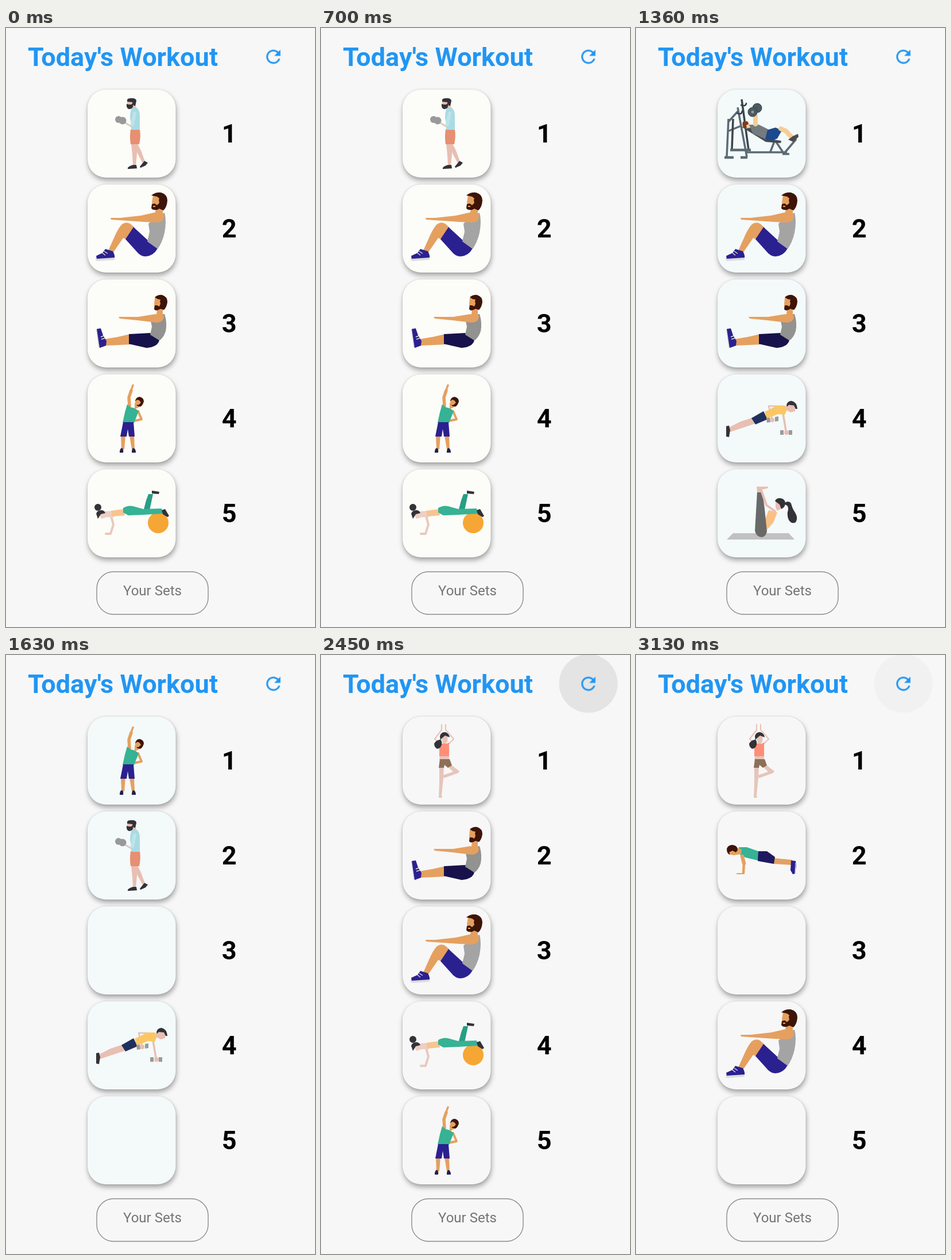
These frames come from a looping animation (538x1041 px, 3.19 s). An HTML page:

```html
<!DOCTYPE html>
<html lang="en">
<head>
<meta charset="utf-8">
<title>Today's Workout</title>
<style>
html, body { margin: 0; width: 100%; height: 100%; overflow: hidden; background: #f7f7f7; }
svg { display: block; width: 100%; height: 100%; }
text { font-family: Roboto, sans-serif; }
.title { font-size: 45px; font-weight: 700; fill: #2196f3; }
.number { font-size: 45px; font-weight: 700; text-anchor: middle; }
.label { font-size: 24px; fill: #757575; }
.card { filter: drop-shadow(0 0 1.5px #0002) drop-shadow(1px 5px 4px #0005); }

.card, .scene, .ripple { animation: 3190ms step-end infinite; }
.card { animation-name: tint; }
.ripple { animation-name: ripple; }
.scene { opacity: 0; }
@keyframes tint { 0% { fill: #fcfcf8 } 29.15% { fill: #f4f9fa } 55.48% { fill: #fafaf5 } 76.8%, to { fill: #f7f7f7 } }
@keyframes ripple {
  0% { opacity: 0 }
  29.15% { opacity: .072 } 31.34% { opacity: .05 } 33.54% { opacity: .025 } 35.73% { opacity: 0 }
  55.48% { opacity: .072 } 57.67% { opacity: .055 } 59.87% { opacity: .035 } 62.06% { opacity: .018 } 64.57% { opacity: 0 }
  76.8% { opacity: .072 } 78.99% { opacity: .05 } 81.18% { opacity: .025 } 83.38% { opacity: 0 }
  98.11%, to { opacity: .022 }
}
@keyframes scene0 { 0% { opacity: 1 } 29.15%, to { opacity: 0 } }
@keyframes scene1 { 0% { opacity: 0 } 29.15% { opacity: 1 } 51.09%, to { opacity: 0 } }
@keyframes scene2 { 0% { opacity: 0 } 51.09% { opacity: 1 } 55.48%, to { opacity: 0 } }
@keyframes scene3 { 0% { opacity: 0 } 55.48% { opacity: 1 } 76.8%, to { opacity: 0 } }
@keyframes scene4 { 0% { opacity: 0 } 76.8% { opacity: 1 } 98.11%, to { opacity: 0 } }
@keyframes scene5 { 0% { opacity: 0 } 98.11%, to { opacity: 1 } }

.tan { fill: #e5a060 } .pink { fill: #e8bfb2 } .cream { fill: #f6cd96 }
.brown { fill: #3d1407 } .ink { fill: #323238 } .navy { fill: #2b2090 }
.teal { fill: #36b294 } .gray { fill: #a4a4a4 }
.line { fill: none; stroke-linecap: round; stroke-linejoin: round; }
.line.tan { fill: none; stroke: #e5a060 } .line.pink { fill: none; stroke: #e8bfb2 }
.line.cream { fill: none; stroke: #f6cd96 } .line.steel { fill: none; stroke: #5c6a76; stroke-linecap: butt }
</style>
</head>
<body>
<svg viewBox="0 0 538 1041" id="stage">
<defs>
  <g id="curl">
    <path class="pink" d="M229 201l6 12 7 19-4 3-9-17-4-14zM218 201h11l-1 18-2 20h-5l-1-18z"/>
    <path class="ink" d="M212 243q2-3 9-5h6l1 6-16 1zM233 241l8-10 6 3-4 5-9 4z"/>
    <path fill="#e78f72" d="M217 176h16q2 13-1 26h-15q-2-13 0-26z"/>
    <path class="pink" d="M218 131h8v10h-8z"/>
    <path fill="#a9dbe4" d="M219 139l8-1q6 4 6 15v24h-15q0-14-2-20 0-12 3-18z"/>
    <path class="line" stroke="#d6cec8" stroke-width="3" d="M206 164l12 7"/>
    <path class="line" stroke="#bfe3e8" stroke-width="6" d="M224 148l-4 20"/>
    <path class="pink" d="M211 125h11v9h-11z"/>
    <path class="ink" d="M211 126q-1-4 8-4 8 0 8 5l-2 8-3 0-2-6-9-1zM210 132l4 1 4 0 3-3v7q-2 4-7 4-5-2-4-9z"/>
    <g fill="#999"><circle cx="196" cy="159" r="6"/><circle cx="203" cy="161" r="6.5"/></g>
  </g>
  <g id="sit"><g transform="translate(0 -165)">
    <path class="tan" d="M202 341q7-5 14-1l8 7-15 20-5-2-18 26-8-4 13-29q6-12 11-17z"/>
    <path class="navy" d="M222 346l24 22 18 15q-7 13-21 14-9 0-16-9l-19-21z"/>
    <path class="gray" d="M264 326l12-5q4 14 0 35-4 17-12 28l-18-13 4-17-2-14z"/>
    <path class="tan" d="M262 310l11 2v13h-14zM182 330l17 0 36-4 22-5q12-3 17 2 4 14-12 15l-21-1-44-3-14-1z"/>
    <path class="tan" d="M256 291h14v24h-14l-2-12z"/>
    <path class="brown" d="M253 291q7-6 17-5 11 3 11 14-1 12-7 17l-7-3-4 2q-8 1-10-3l1-7 5-1 4 3 4-4-1-5 1-3-4-3z"/>
    <path d="M256 310h4" stroke="#e5a060" stroke-width="2"/>
    <path fill="#dcdcdc" d="M156 399l33-1v5l-30 2q-4-1-3-6z"/>
    <path class="navy" d="M157 396l11-5 5-7 13 4q4 7 3 11l-31 2z"/>
    <path d="M168 391l5 4M171 388l6 4" stroke="#ddd" stroke-width="1.5"/>
  </g></g>
  <g id="reach"><g transform="translate(0 -330)">
    <path class="tan" d="M170 541l24-4 22-5v18l-43 2z"/>
    <path fill="#17124b" d="M214 532l37-2 16 12q-2 12-22 14l-31-7z"/>
    <path fill="#929290" d="M263 500l13-3q5 15 2 30-4 12-11 16l-16-10 3-14-2-10z"/>
    <path class="tan" d="M263 487h10v12h-11zM196 502l34 0 25-4q16-3 20 3-1 11-13 11l-33-4-31-3z"/>
    <path class="tan" d="M259 469h12v21h-12l-1-10z"/>
    <path class="brown" d="M259 468q6-5 13-4 9 3 9 12-1 9-6 14l-6-2-4 2q-6 2-7-2l1-6 4 0 4 2 2-5-1-4 1-3-5-1z"/>
    <path fill="#ddd" d="M157 525l3-2 4 31-3 2z"/>
    <path class="navy" d="M158 523l7-1 4 12 6 10-1 8-11 4z"/>
    <path d="M165 537l5-2M166 541l6-2" stroke="#ddd" stroke-width="1.5"/>
  </g></g>
  <g id="stretch"><g transform="translate(0 -495)">
    <path class="line tan" stroke-width="5.5" d="M215 657l-1-15 4-12"/>
    <path class="line tan" stroke-width="3.5" d="M218 629l3-8"/>
    <path class="line tan" stroke-width="4" d="M230 666l6 14-14 3"/>
    <path class="tan" d="M200 708h8l-2 24h-5zM215 708h8l1 24h-5z"/>
    <path class="teal" d="M211 654l6 5 8 2 6 5-8 20h-20l4-18z"/>
    <path class="navy" d="M204 685h18l2 25h-10l-2-13-2 13h-11z"/>
    <path fill="#202052" d="M198 738q0-8 4-8 3 1 2 8zM219 738q0-8 3-8 4 1 4 8z"/>
    <path class="tan" d="M224 653l3-8h9v8l-6 7-6 2z"/>
    <path class="brown" d="M225 649q1-8 8-8 7 2 7 8-2 7-6 9-5 0-7-3l4 0 4-4-3-4-4-1z"/>
  </g></g>
  <g id="ball"><g transform="translate(0 -660)">
    <circle cx="265" cy="860" r="18" fill="#f6a635"/>
    <path class="line" stroke="#e8c9bd" stroke-width="4" d="M183 848l4 15-5 16h-8"/>
    <path fill="#ecd0c4" d="M161 844l11-4 16-1v11l-12 0-10 3z"/>
    <path fill="#f7c490" d="M183 839l22-3 2 11-22 2z"/>
    <path fill="#289e84" d="M239 840l5-19 4-11 8 0-6 28z"/>
    <path class="teal" d="M204 834q9-5 17-3l18 5 32-1 2 9-34 2-26 1-9-5z"/>
    <path class="ink" d="M254 804l13 2-1 4-12-1zM271 838l6-2 7 12-3 2-8-5z"/>
    <circle class="ink" cx="160" cy="833" r="6"/>
    <path class="ink" d="M157 844q2-6 9-6 5 0 7 5l-8 2-5 8z"/>
  </g></g>
  <g id="bench">
    <g class="line steel" stroke-width="3.5">
      <path d="M161 158l-3 66M177 138l16 86M160 164l18-20M161 179l22-9"/>
      <path d="M184 124l12 88M169 158l-2 52" stroke="#39454e"/>
      <path d="M164 212h36M154 225h16M182 225h12" stroke-width="4.5"/>
      <path d="M190 216h73M241 197l-7 18M244 198l12 18M257 219l22-26M255 219h12"/>
    </g>
    <path class="line" stroke="#333e46" stroke-width="2.5" d="M176 148q8 4 9-4M183 134q8 3 9-3"/>
    <path fill="#424c53" d="M184 172l9-2 40 23 20 3-1 4-26-2z"/>
    <path class="cream" d="M189 164l7-1 4 10-9 2z"/>
    <path fill="#7f3b20" d="M186 163l8-1 2 5-4 2 1 6-5-2q-4-4-2-10z"/>
    <path fill="#747b7f" d="M197 168l17 0 16 8-3 18-24-11z"/>
    <path class="line cream" stroke-width="8" d="M208 153v14"/>
    <path fill="#1b4a8d" d="M229 177l14-4 11 5-8 14-9 4-12-3z"/>
    <path class="line cream" stroke-width="8" d="M252 175l9 4 10 11"/>
    <path fill="#4b4b4e" d="M265 194l8-6 9-4 1 5-9 9z"/>
    <g fill="#4b5961" stroke="#36434a"><circle cx="211" cy="139" r="8"/><circle cx="203" cy="146" r="8"/></g>
    <circle cx="203" cy="146" r="2.5" fill="#8c989e"/>
  </g>
  <g id="row"><g transform="translate(0 -495)">
    <path class="pink" d="M203 677l6 10-24 8-21 7-2-8 20-10z"/>
    <path fill="#20305d" d="M201 678l21-12 7 14-21 9z"/>
    <path class="line pink" stroke-width="2.5" d="M245 657l-14 0 6 22"/>
    <path class="line pink" stroke-width="3.5" d="M256 670l5 30"/>
    <path fill="#fbc764" d="M224 667l22-11 13 0 4 7-4 9-12-1-19 8z"/>
    <path class="pink" d="M260 657l8-4 10 4-1 9-8 2-7-4z"/>
    <path class="ink" d="M262 655q2-7 9-7 9 2 10 14h-3l-3-6-9-1-3 3z"/>
    <path class="ink" d="M157 692l5-1 2 8-2 12-5-1z"/>
    <g fill="#9b9b9b"><path d="M251 699h6v8h-6zM266 699h6v8h-6zM227 678l6-1 1 8-6 1zM242 676l6-1v8l-6 1z"/></g>
    <circle class="pink" cx="262" cy="703" r="4"/><circle class="pink" cx="237" cy="681" r="4"/>
  </g></g>
  <g id="lift"><g transform="translate(0 -660)">
    <path fill="#c1c1c1" d="M169 878h97l10 11H158z"/>
    <path fill="#fac085" d="M231 838l15 4-7 18-12 13-5-11z"/>
    <path fill="#696969" d="M211 806h9l4 30 4 39q-2 9-9 10-9 0-12-11l2-34z"/>
    <path class="pink" d="M210 797l20 0-1 3-9 2v5h-9z"/>
    <path class="line pink" stroke-width="4" d="M219 806l8 23 15 11"/>
    <path class="pink" d="M243 822h11l1 12-9 5-3-5z"/>
    <path class="ink" d="M242 822q2-5 9-5 8 1 9 8 0 8-7 11l-3-8z"/>
    <path class="ink" d="M258 826q7-6 12 0 2 9 7 16 6 10 1 17-7 4-12-4-4-9-1-18 1-8-7-9z"/>
  </g></g>
  <g id="rower"><g transform="translate(0 -330)">
    <circle cx="262" cy="505" r="20.5" fill="#39484c"/><circle cx="262" cy="504" r="6" fill="#20292c"/>
    <g class="line steel">
      <path stroke-width="4.5" d="M155 531l68 5M160 532l-2 14M184 529h10"/>
      <path stroke-width="7.5" d="M283 502l-28 17-36 18"/>
      <path stroke-width="4" d="M248 522l14 23M281 506l-13 39"/>
      <path stroke-width="4" d="M154 546h9M259 546h12"/>
    </g>
    <path d="M186 508l58-6" stroke="#434d54" stroke-width="1.2"/>
    <path class="cream" d="M163 482h12v8l-4 5h-8zM157 495l6-4 7 2v19h-12q-4-9-1-17z"/>
    <path fill="#7d858a" d="M163 491l12 3 3 18-11 4-4-12z"/>
    <path class="line cream" stroke-width="5" d="M159 502l7 10 21-4"/>
    <path fill="#7a4923" d="M162 482q2-5 8-5l5 3-1 4-6 1-3 6z"/>
    <path class="ink" d="M174 527h14v4h-14z"/>
    <path class="line cream" stroke-width="8" d="M199 515l13 17"/>
    <path fill="#0e4c92" d="M168 515l14-1 14-3 5 4-7 11-16 4q-8-3-10-15z"/>
    <path class="ink" d="M210 538l12-4 3-7 3 1-2 13-16 2z"/>
  </g></g>
  <g id="tree">
    <g style="--skin:#e6c5ba" fill="#e6c5ba">
      <path class="line" stroke="#e6c5ba" stroke-width="2.2" d="M210 121v9l-12 16 10 8M217 121v9l14 16-9 9"/>
      <path d="M206 194h8l-1 20-3 30 1 4h-6l1-24zM207 174h16v9h-17z"/>
      <path d="M222 195l6-3 13 10-2 3-25 9-2-5 18-6z"/>
      <path d="M209 139h12l-1 12-3 3h-5z"/>
    </g>
    <path fill="#8e6f58" d="M207 181h17l4 11-7 4-6-5-1 5h-9z"/>
    <path fill="#ff8e79" d="M206 152l4 2 9 0 4-2v24h-17z"/>
    <path class="ink" d="M207 142q1-8 9-8 7 2 8 9l-8-3-6 5-2 3z"/>
    <path class="ink" d="M208 147q3 3 2 9-2 7-8 7-5-3-5-9 3-6 11-7z"/>
  </g>
  <g id="plank"><g transform="translate(0 -165)">
    <path class="tan" d="M240 353l32 3v9l-32-2z"/>
    <path fill="#1f1960" d="M212 341l16 0 14 10-2 12-28-5z"/>
    <path class="teal" d="M179 334l14 0 20 7-1 16-21-5-10-5z"/>
    <path class="line tan" stroke-width="6.5" d="M185 350l3 12"/>
    <path class="line tan" stroke-width="4.5" d="M188 361l-1 17"/>
    <path class="line tan" stroke-width="2" d="M176 380h12"/>
    <path class="tan" d="M160 339l17-4 7 3-1 8-13 2-9-2z"/>
    <path class="brown" d="M158 337q2-7 10-7 9 1 9 9l-3 4-6-3-6 3 2 4q-6-1-6-10z"/>
    <path class="navy" d="M270 357l8 1 1 8-2 14-4 1-4-7z"/>
    <path d="M278 361l-1 19" stroke="#ddd" stroke-width="1.2"/>
  </g></g>
</defs>

<circle class="ripple" cx="465.5" cy="49.5" r="51"/>
<text class="title" x="38" y="66">Today's Workout</text>
<path fill="#2196f3" transform="translate(447 31.5) scale(1.54)" d="M17.65 6.35C16.2 4.9 14.21 4 12 4c-4.42 0-7.99 3.58-7.99 8s3.57 8 7.99 8c3.73 0 6.84-2.55 7.73-6h-2.08c-.82 2.33-3.04 4-5.65 4-3.31 0-6-2.69-6-6s2.69-6 6-6c1.66 0 3.14.69 4.22 1.78L13 11h7V4l-2.35 2.35z"/>
<rect x="158" y="945" width="194" height="74" rx="29" fill="none" stroke="#8c8c8c" stroke-width="1.4"/>
<text class="label" x="204" y="985.5">Your Sets</text>
</svg>
<script>
const scenes = [
  "curl sit reach stretch ball",
  "bench sit reach row lift",
  "stretch curl - row -",
  "stretch curl rower row tree",
  "tree reach sit ball stretch",
  "tree plank - sit -"
];
const pitch = 165;
const rows = [0, 1, 2, 3, 4].map(i => `
  <rect class="card" x="142" y="${107 + i * pitch}" width="153.5" height="153" rx="32"/>
  <text class="number" x="388.7" y="${199 + i * pitch}">${i + 1}</text>`);
const groups = scenes.map((names, n) => {
  const figures = names.split(" ").map((name, i) =>
    name === "-" ? "" : `<use href="#${name}" y="${i * pitch}"/>`);
  return `<g class="scene" style="animation-name:scene${n}">${figures.join("")}</g>`;
});
document.getElementById("stage").insertAdjacentHTML("beforeend", rows.join("") + groups.join(""));
</script>
</body>
</html>
```
